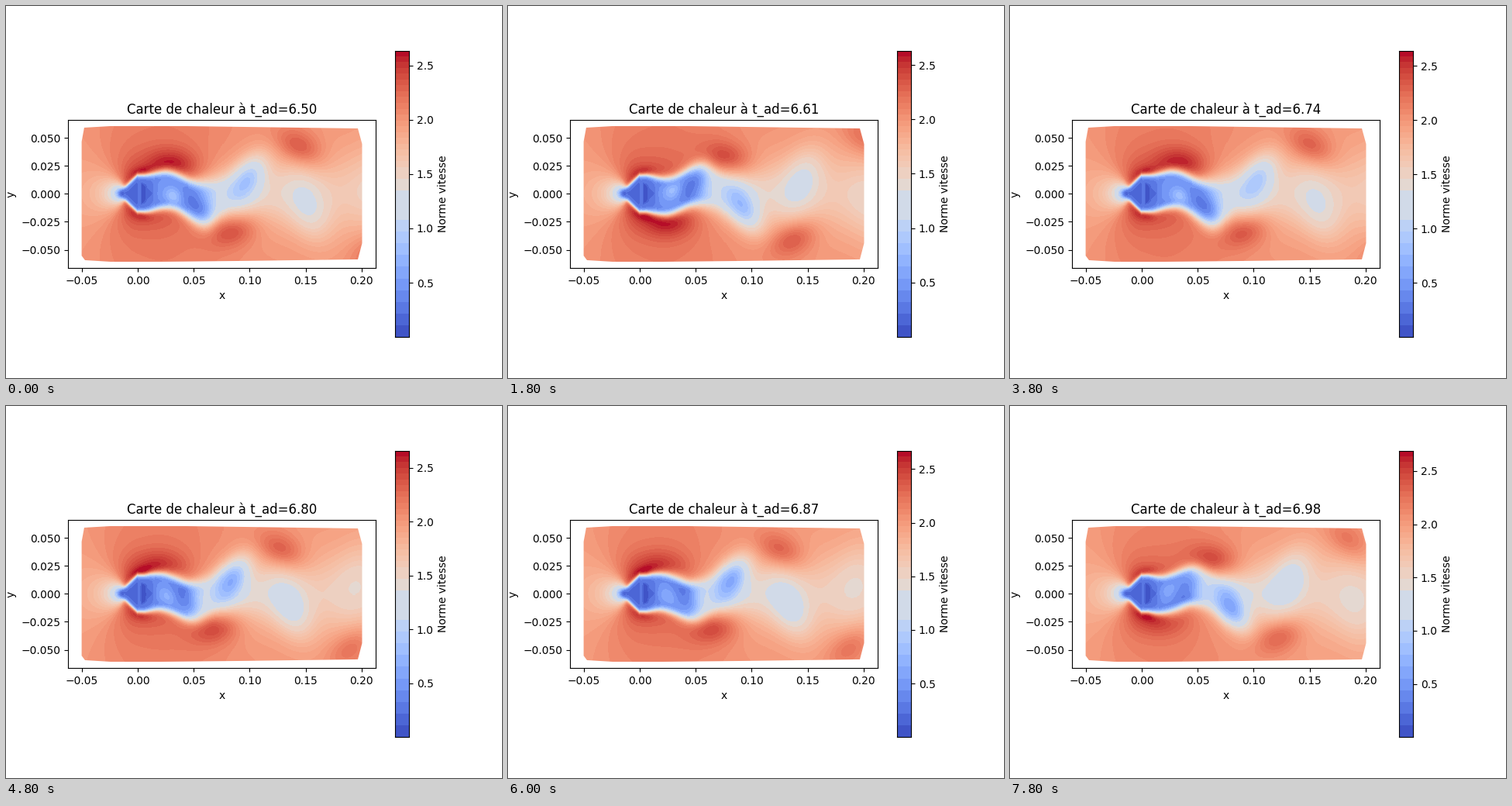
A matplotlib script that plays this animation: 640 by 480 pixels, repeating every 8 s.

```python
import numpy as np
import matplotlib.pyplot as plt
from matplotlib.animation import FuncAnimation
from matplotlib.patches import Polygon

FRAMES, INTERVAL = 40, 200
BANDS = 49
SCALE = 1442.9          # pixels per metre
LEFT, MID = 80, 242.4   # pixel position of the axes' left edge and of y = 0
XMIN, XMAX, YMAX = -0.0625, 0.2125, 0.0662

plt.rcParams["font.family"] = "DejaVu Sans"
fig = plt.figure(figsize=(6.4, 4.8), dpi=100)
ax = fig.add_axes([0.125, 0.11, 0.62, 0.77])
cax = fig.add_axes([0.78375, 0.11, 0.028875, 0.77])

# One grid cell per screen pixel, coordinates in millimetres
px, py = np.arange(96, 462), np.arange(153, 333)
x = 1000 * ((px + 0.5 - LEFT) / SCALE + XMIN)[None, :]
y = 1000 * ((MID - py - 0.5) / SCALE)[:, None]
extent = [(px[0] - LEFT) / SCALE + XMIN, (px[-1] + 1 - LEFT) / SCALE + XMIN,
          (MID - py[-1] - 1) / SCALE, (MID - py[0]) / SCALE]


def sigmoid(t):
    return 1 / (1 + np.exp(-np.clip(t, -60, 60)))


def blob(cx, cy, along, across, angle):
    """Tilted Gaussian of height one."""
    c, s = np.cos(np.radians(angle)), np.sin(np.radians(angle))
    u = (x - cx) * c + (y - cy) * s
    v = (y - cy) * c - (x - cx) * s
    return np.exp(-0.5 * ((u / along) ** 2 + (v / across) ** 2))


def band_colors():
    """Coolwarm steps, coarser on the cold side."""
    edges = [*range(0, 20, 2), 20, 25, 27, 29, *range(30, BANDS + 1)]
    colors = np.empty((BANDS, 3))
    for lo, hi in zip(edges, edges[1:]):
        colors[lo:hi] = plt.cm.coolwarm((lo + hi) / (2 * BANDS))[:3]
    return colors


def outer_flow():
    """Steady flow past the blunt body, without its wake."""
    z = np.where(x > 0, 0.35 * x, x) + 1j * y
    z = np.where(abs(z) < 8, 8, z)
    p = 1.98 * abs(1 - 196 / z ** 2)
    p = p + 0.12 * np.exp(-((x - 25) / 45) ** 2) * sigmoid((abs(y) - 12) / 5)
    p = np.where(p > 2.1, 2.1 + 0.35 * np.tanh((p - 2.1) / 0.7), p)
    p = p - 0.25 * np.exp(-(y / 35) ** 2) * sigmoid((x - 60) / 10)
    for side in (1, -1):
        p = p + 0.25 * blob(3, 18 * side, 6, 3.5, 15 * side)
    return p


def wake_floor():
    """Speed inside the body and the still water behind it."""
    f = 0.2 + 0.25 * sigmoid((x - 14) / 2) + 0.08 * np.exp(-((x - 1) / 1) ** 2)
    return f - 0.1 * ((x > 3) & (x < 13) & (abs(y) < 13 - x))


COLORS = band_colors()
OUTER = outer_flow()
FLOOR = wake_floor()
TRAVEL = (-100 + np.sqrt(10000 + 64 * (x - 97))) / 32   # periods needed to reach x
HALF = np.where(x < 0, np.minimum(14.5 * (x + 17) / 15, 16),
                16 - 3.5 * np.clip((x - 25) / 45, 0, 1))
EDGE = 1.2 + 2.3 * np.clip(x / 60, 0, 1)
SWING = 0.2 * np.clip(x - 6, 0, 66)


def speed(phase):
    center = SWING * np.cos(2 * np.pi * (TRAVEL - phase - 0.09))
    off = abs(y - center)
    tip = 59 + 9 * np.cos(4 * np.pi * (phase - 0.07))
    floor = FLOOR + 0.82 * sigmoid((x - tip) / 4)
    floor = floor - 0.12 * np.exp(-((off - 11) / 3) ** 2) * ((x > 15) & (x < 45))
    outer = OUTER
    hollow = 1.0

    half_turns = int(np.floor(2 * phase))
    for m in range(-2, 3):
        s = phase - half_turns / 2 + m / 2
        side = 1 if (m - half_turns) % 2 == 0 else -1
        cx = 97 + 100 * s + 16 * s * s
        grow = cx - 77

        # fast patch on the other side of the vortex
        lag = min(20, 4 + 18 * np.exp((52 - cx) / 55))
        height = 25 + 0.157 * (cx - 52)
        gain = 0.42 * sigmoid((s + 0.72) / 0.08) * np.exp(-max(s - 0.5, 0))
        outer = outer + gain * blob(cx - lag, -side * height, 16, 10.5,
                                    side * (5 + 0.25 * (cx - 52)))

        # slow core, born inside the near wake
        depth = min(0.6, 0.6 * np.exp(-grow / 75)) * sigmoid((s + 0.72) / 0.04)
        depth *= 0.75 + 0.25 * sigmoid((s + 0.35) / 0.04)
        cy = side * min(12, 11 + 75 * (s + 0.5))
        hollow = hollow * (1 - depth * blob(cx, cy, 15 + 0.09 * grow, 8 + 0.06 * grow,
                                            side * (58 + 0.2 * max(grow - 20, 0))))

        # lighter eye of the recirculation
        floor = floor + 0.4 * np.exp(-(s / 0.2) ** 2) * blob(
            32 + 40 * s, -2 * side, 6, 4.5, -30 * side)

    mask = sigmoid((HALF - off) / EDGE) * sigmoid((82 - x) / 4)
    return (outer * (1 - mask) + floor * mask) * hollow


def paint(field, top):
    band = np.clip((field / top * BANDS).astype(int), 0, BANDS - 1)
    return COLORS[band]


def top_speed(n):
    return np.interp(n, [0, 9, 15, 19, 24, 30, 39],
                     [2.635, 2.631, 2.638, 2.642, 2.661, 2.672, 2.692])


heat = ax.imshow(paint(speed(0), top_speed(0)), extent=extent, interpolation="nearest")
outline = [(-.0503, .0467), (-.048, .0592), (-.0244, .0606), (.0415, .0606),
           (.1967, .0585), (.2005, .0446), (.2005, -.0441), (.1967, -.0586),
           (.09, -.06), (.0207, -.0607), (-.0244, -.0607), (-.0473, -.0593),
           (-.0503, -.0553)]
heat.set_clip_path(Polygon(outline, closed=True, transform=ax.transData))
ax.set_aspect("equal")
ax.set_xlim(XMIN, XMAX)
ax.set_ylim(-YMAX, YMAX)
ax.set_xticks(np.arange(-1, 5) * 0.05)
ax.set_yticks(np.arange(-2, 3) * 0.025)
ax.set_xlabel("x")
ax.set_ylabel("y")
title = ax.set_title("")

cax.imshow(COLORS[:, None, :], extent=[0, 1, 0, 1], origin="lower", aspect="auto",
           interpolation="nearest", transform=cax.transAxes)
cax.set_xlim(0, 1)
cax.set_xticks([])
cax.yaxis.tick_right()
cax.yaxis.set_label_position("right")
cax.set_yticks([0.5, 1.0, 1.5, 2.0, 2.5])
cax.set_ylabel("Norme vitesse")


def update(n):
    top = top_speed(n)
    heat.set_data(paint(speed(0.1593 * n + 0.00007 * n * n), top))
    cax.set_ylim(0, top)
    title.set_text(f"Carte de chaleur à t_ad={6.503 + 0.0123 * n:.2f}")
    return heat, title


anim = FuncAnimation(fig, update, frames=FRAMES, interval=INTERVAL,
                     repeat=True, blit=False)
plt.show()
```
